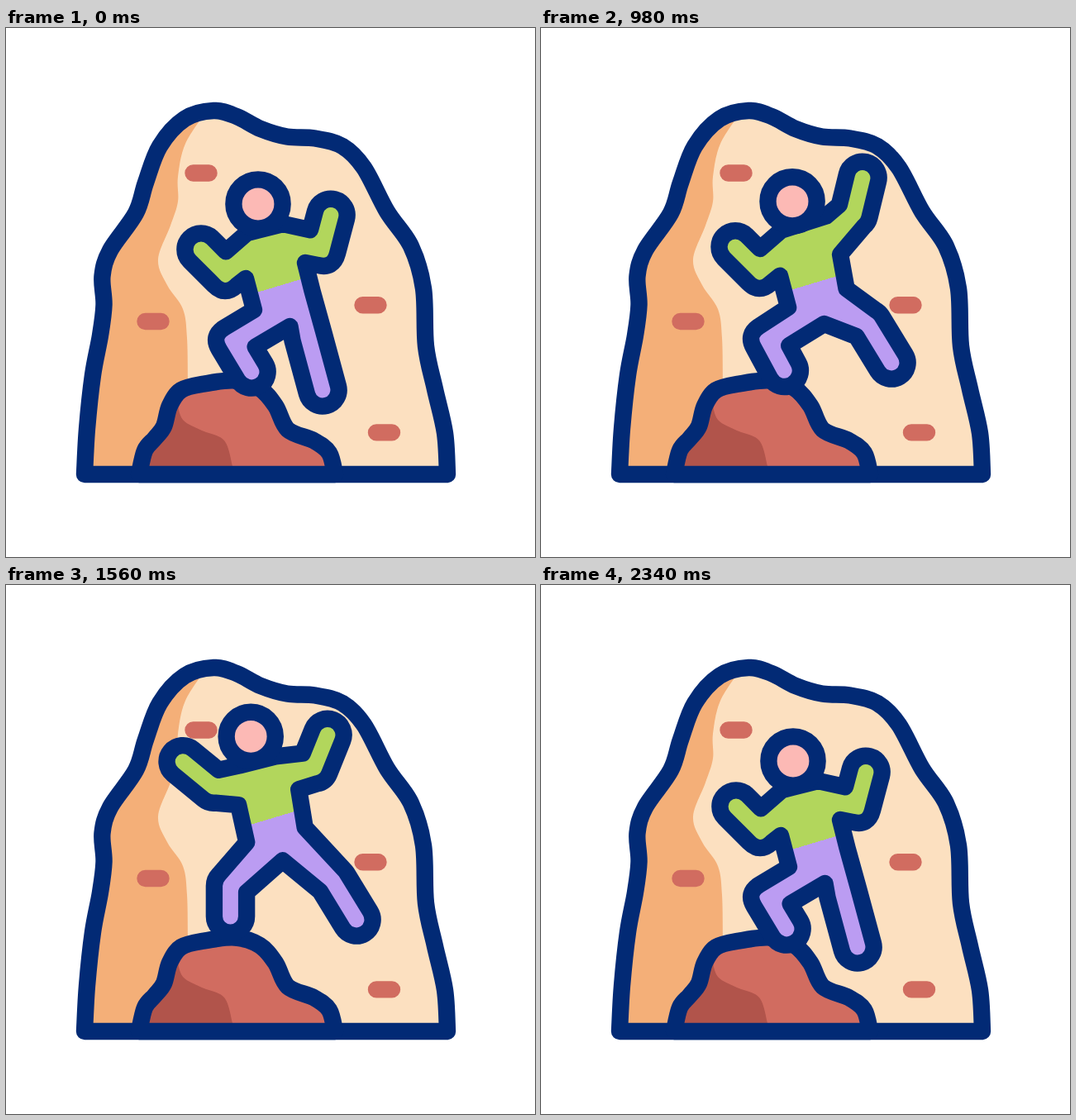
An HTML page that plays this animation: 640 by 640 pixels, repeating every 2.4 s.

```html
<!DOCTYPE html>
<html lang="en">
<head>
<meta charset="utf-8">
<title>Climber</title>
<style>
  html, body { margin: 0; height: 100%; overflow: hidden; background: #fff; }
  svg { display: block; width: 100%; height: 100%; }
  .line { stroke: #022a75; stroke-width: 20.4; stroke-linejoin: round; }
</style>
</head>
<body>
<svg viewBox="0 0 640 640">
  <defs>
    <path id="cliff"/>
    <path id="boulder"/>
    <clipPath id="inCliff"><use href="#cliff"/></clipPath>
    <clipPath id="inBoulder"><use href="#boulder"/></clipPath>
    <linearGradient id="suit" gradientUnits="userSpaceOnUse" x1="327" y1="302" x2="333" y2="322">
      <stop offset=".5" stop-color="#b2d65c"/>
      <stop offset=".5" stop-color="#bb9cf2"/>
    </linearGradient>
  </defs>
  <use href="#cliff" fill="#fce0c0"/>
  <path id="cliffShade" clip-path="url(#inCliff)" fill="#f4af78"/>
  <path stroke="#d16c60" stroke-width="20.4" stroke-linecap="round" d="M226.5 175.5h19M431.5 335.3h19M168.5 355h19M448 489.4h19"/>
  <use href="#cliff" class="line" fill="none"/>
  <use href="#boulder" fill="#d16c60"/>
  <path id="boulderShade" clip-path="url(#inBoulder)" fill="#b1544b"/>
  <use href="#boulder" class="line" fill="none"/>
  <path id="body" class="line" fill="url(#suit)"/>
  <circle id="head" class="line" r="29.6" fill="#fcb9b5"/>
</svg>
<script>
const LOOP = 2400;
const LIMB = 19.6; // half the width of a limb
const LIFT = [-8.8, -29.7];
const $ = id => document.getElementById(id);

const add = (a, b, k = 1) => [a[0] + k * b[0], a[1] + k * b[1]];
// A point moved by weighted offsets: [weight, dx, dy].
const place = (x, y, ...moves) => moves.reduce((p, [w, ...d]) => add(p, d, w), [x, y]);

// Smooth path through key points, closed by a straight edge.
function smooth(text) {
  const pts = text.split(' ').map(p => p.split(',').map(Number));
  const at = i => pts[Math.max(0, Math.min(pts.length - 1, i))];
  const tangent = i => add(at(i + 1), at(i - 1), -1);
  return 'M' + pts[0] + pts.slice(1).map((p, i) =>
    `C${add(pts[i], tangent(i), 1 / 6)} ${add(p, tangent(i + 1), -1 / 6)} ${p}`).join('');
}

// Outline of a two-part limb with a round tip, rounded on the outside of its bend.
function limb(root, joint, tip) {
  const side = (a, b) => {
    const [x, y] = add(b, a, -1), k = LIMB / Math.hypot(x, y);
    return [y * k, -x * k];
  };
  const upper = side(root, joint), lower = side(joint, tip);
  const dot = upper[0] * lower[0] + upper[1] * lower[1];
  const cross = upper[0] * lower[1] - upper[1] * lower[0];
  const corner = add(upper, lower).map(v => v / (1 + dot / LIMB ** 2));
  const bend = (from, to, sign) => cross * sign > 0
    ? `L${add(joint, from, sign)}Q${add(joint, corner, sign)} ${add(joint, to, sign)}`
    : `L${add(joint, corner, sign)}`;
  return bend(upper, lower, 1)
    + `L${add(tip, lower)}A${LIMB} ${LIMB} 0 0 1 ${add(tip, lower, -1)}`
    + bend(lower, upper, -1);
}

function ease(t, start, end) {
  const p = Math.min(1, Math.max(0, (t - start) / (end - start)));
  return p * p * (3 - 2 * p);
}

function draw() {
  const t = performance.now() % LOOP;
  const drop = ease(t, 1600, 1940);
  const limbsBack = ease(t, 1940, 2320);
  const arm = ease(t, 100, 500) - limbsBack;
  const leg = ease(t, 500, 900) - limbsBack;
  const lift = ease(t, 900, 1300) - drop;
  const reach = ease(t, 1300, 1600) - drop;
  const rise = [lift, ...LIFT];
  const torso = (x, y, ...moves) => place(x, y, rise, ...moves);

  const leftArm = limb(torso(295, 270),
    torso(265.5, 297.5, [reach, -5.7, -24.8]),
    torso(236, 268, [reach, -13.7, -25.8]));
  const rightArm = limb(torso(343, 258),
    place(382, 268, [arm, -3, -42.5], [lift, -6, -4.5]),
    place(393, 226.3, [arm, -4, -45]));
  const rightLeg = limb(torso(356.5, 340),
    place(365.5, 373.4, [leg, 30, -15]),
    place(383, 438, [leg, 41, -33]));
  const leftLeg = limb(torso(321.5, 351),
    place(274.7, 379, [lift, -3.2, -15]),
    place(297, 416, [lift, -25.5, -15]));

  $('body').setAttribute('d', `M${torso(290, 303, [reach, 0, -7.5])}${leftArm}
    L${torso(291.5, 248)}L${torso(335, 237, [arm - lift, 12, -7])}${rightArm}
    L${torso(362, 284, [arm, 1, -7])}L${torso(370.5, 318, [lift, 0, 5])}${rightLeg}
    L${torso(343.5, 361, [lift, 0, 2])}${leftLeg}L${torso(300, 341)}Z`);

  const [cx, cy] = torso(305, 213);
  $('head').setAttribute('cx', cx);
  $('head').setAttribute('cy', cy);
  $('suit').setAttribute('gradientTransform', `translate(${LIFT.map(v => v * lift)})`);
  requestAnimationFrame(draw);
}

const setPath = (id, d) => $(id).setAttribute('d', d);
setPath('cliff', smooth('95,540 98,485 105,420 114,372 118.5,335 116.5,300 126,269 157,224 169,187 186,143 216,110 251,100 279,107 308,122 340,131.5 374,133.5 407,143 433,169 461,222 490,264 505,315 508,385 519,437 531,490 534,540') + 'Z');
setPath('boulder', smooth('161,540 168,511 180,496.5 191,482 198,457 212,438 240,430.5 277,426.5 307,436 326,457 341,486 372,499 391,514 398,540') + 'Z');
setPath('cliffShade', smooth('243,100 217,140 208,180 208,210 199,239 184,280 195,311 214,340 219,375 220,430') + 'V540H80V100Z');
setPath('boulderShade', smooth('207,452 214,474 237,487 264,499 274,530') + 'V540H150V452Z');
draw();
</script>
</body>
</html>
```
